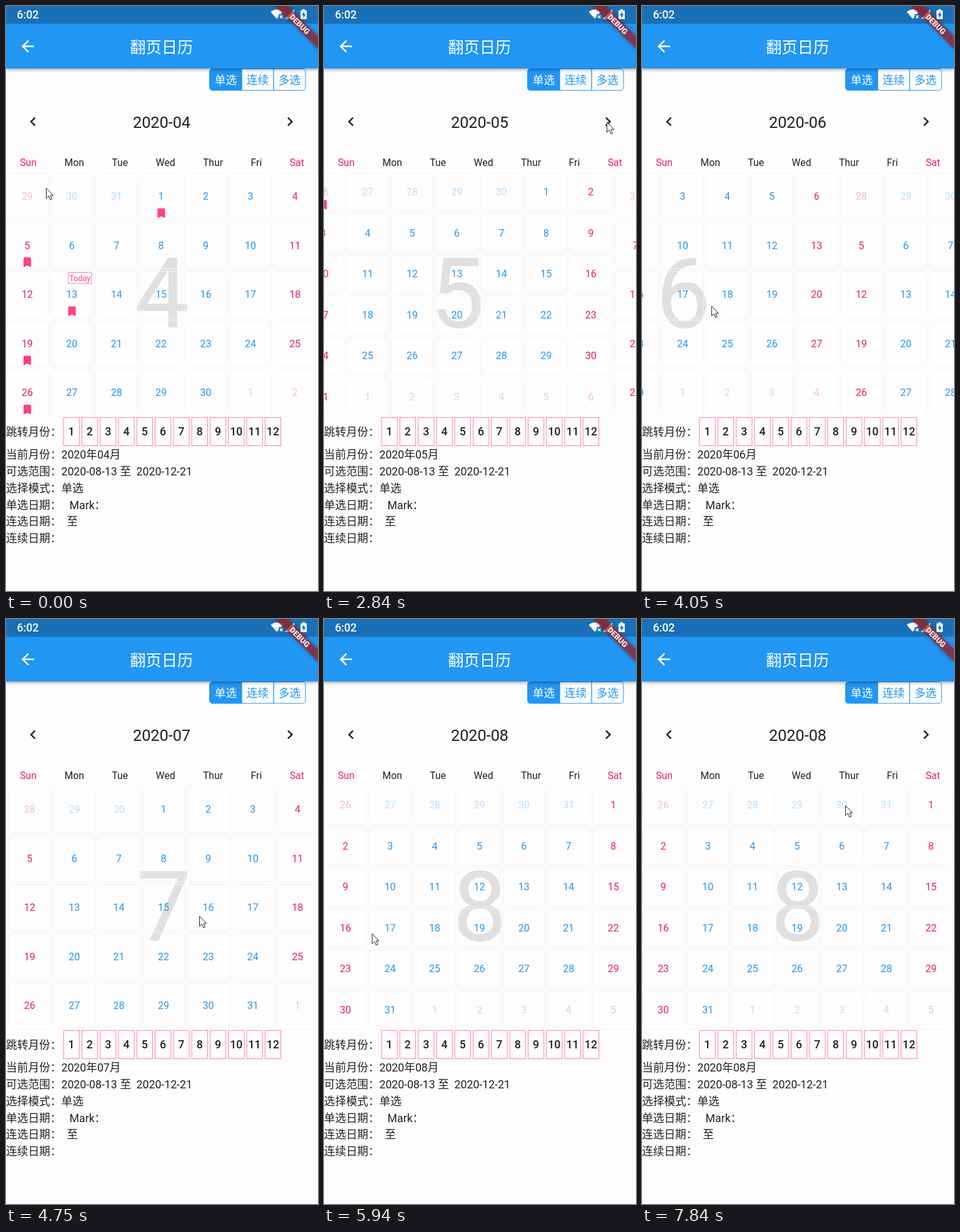
These frames come from a looping animation (499x936 px, 8 s). An HTML page:

```html
<!DOCTYPE html>
<html lang="zh-CN">
<head>
<meta charset="utf-8">
<style>
html, body { margin: 0; height: 100%; overflow: hidden; background: #fdfdfd }
svg { display: block; width: 100vw; height: 100vh }
text, .week { font-family: Roboto, "Noto Sans CJK SC", "Noto Sans CJK", sans-serif; white-space: pre }
.week { display: flex; justify-content: space-around; font-size: 15.8px; line-height: 20px; color: #212121 }
.week :first-child, .week :last-child { color: #e91e63 }
.bar { filter: drop-shadow(0 2px 2.5px rgba(0,0,0,.35)) }
.banner { filter: drop-shadow(0 0 3px rgba(0,0,0,.5)) }
</style>
</head>
<body>
<svg id="stage" viewBox="0 0 499 936"></svg>
<script>
const BLUE = '#2196f3', PINK = '#e91e63', ACCENT = '#ff4081', INK = '#212121';
const PAGE = 499.8, COL = PAGE / 7, TOP = 267, GRID = 393, BODY = 17.7, HEAD = 25.26;
const LOOP = 8000, TICK = 134, PHASE = 2840 % TICK;
const MIDDLE = 'text-anchor="middle"';

const text = (x, y, s, size, fill = INK, extra = MIDDLE) =>
  `<text x="${x}" y="${y}" font-size="${size}" fill="${fill}" ${extra}>${s}</text>`;
const icon = (d, x, y, scale, fill) =>
  `<path d="${d}" fill="${fill}" transform="translate(${x} ${y}) scale(${scale}) translate(-12 -12)"/>`;
const box = (x, y, w, h, stroke, rx = 0) =>
  `<rect x="${x}" y="${y}" width="${w}" height="${h}" rx="${rx}" fill="none" stroke="${stroke}"/>`;

const BOOKMARK = 'M17 3H7c-1.1 0-2 .9-2 2v16l7-3 7 3V5c0-1.1-.9-2-2-2z';

function monthPage(m) {
  const first = new Date(2020, m - 1, 1).getDay();
  const rows = Math.ceil((first + new Date(2020, m, 0).getDate()) / 7);
  const pitch = GRID / rows, h = pitch - 4;
  let out = text(249, 514, m, 155, '#e0e0e0');
  for (let i = 0; i < rows * 7; i++) {
    const day = new Date(2020, m - 1, i - first + 1), n = day.getDate();
    const c = i % 7, x = .5 + COL * c, y = TOP + pitch * Math.floor(i / 7), mid = x + 33.4;
    const inside = day.getMonth() === m - 1, april = day.getMonth() === 3;
    const today = april && n === 13;
    const marked = april && (n === 1 || today || c === 0 && n !== 12);
    const fill = c % 6 ? (inside ? BLUE : '#bbdefb') : (inside ? PINK : '#f8bbd0');
    out += box(x, y + .3, 67, h, '#f2f2f2', 5) + text(mid, y + h / 2 + 5.6, n, 16, fill);
    if (marked) out += icon(BOOKMARK, mid + .2, y + h - 10.2, .86, ACCENT);
    if (today)
      out += box(x + 27.8, y + 2.3, 37, 17.5, '#ff80ab') + text(x + 46.3, y + 15.3, 'Today', 12.6, ACCENT);
  }
  return `<g class="page">${out}</g>`;
}

function weekdays() {
  const names = 'Sun Mon Tue Wed Thur Fri Sat'.split(' ').map(s => `<span>${s}</span>`).join('');
  return `<foreignObject y="240.5" width="499" height="20"><div class="week">${names}</div></foreignObject>`;
}

function modes() {
  const label = (i, s) => text(351.5 + 51 * i, 124.7, s, BODY, i ? BLUE : '#fff');
  return `<path d="M377 100.5H330a4.5 4.5 0 0 0-4.5 4.5v25.5a4.5 4.5 0 0 0 4.5 4.5H377z" fill="${BLUE}"/>`
    + box(325.5, 100.5, 153.5, 34.5, BLUE, 4.5)
    + `<path d="M377 100v35M428 100v35" stroke="${BLUE}" stroke-width="1.3"/>`
    + label(0, '单选') + label(1, '连续') + label(2, '多选');
}

function details() {
  const line = (y, s, id = '') => text(0, y, s, BODY, INK, id);
  let out = line(688.3, '跳转月份：');
  for (let i = 0; i < 12; i++) {
    const x = 92 + 29.3 * i;
    out += box(x, 658.5, 25.3, 45, '#ff80ab')
      + text(x + 12.6, 687.4, i + 1, BODY, INK, MIDDLE + ' font-weight="500"');
  }
  const lines = ['', '可选范围：2020-08-13 至  2020-12-21', '选择模式：单选',
    '单选日期：   Mark：', '连选日期：  至', '连续日期：'];
  return out + lines.map((s, i) => line(724.4 + 26.7 * i, s, i ? '' : 'id="current"')).join('');
}

function statusIcons() {
  return `<path d="M423.5 9.5Q433 1.500 442.5 9.5L440 13H436V17L433 20.5Z" fill="#fff"/>
    <path d="M438 15l4.5 4.5m0-4.5l-4.5 4.5" stroke="#fff" stroke-width="1.5"/>
    <path d="M446 20.5H461V5.5Z" fill="#fff"/>
    <path d="M474 5h4v2h3v14h-10V7h3z" fill="#fff"/>
    <path d="M477 8.5l-4 6.5h2.5v4.5l4-6.5H477z" fill="#1a70b6"/>`;
}

function appBar() {
  return `<rect class="bar" width="499" height="100" fill="${BLUE}"/>
    <rect width="499" height="28.4" fill="#1a70b6"/>`
    + icon('M20 11H7.83l5.59-5.59L12 4l-8 8 8 8 1.41-1.41L7.83 13H20z', 35, 64.5, 1.263, '#fff')
    + text(248.7, 74.6, '翻页日历', HEAD, '#fff')
    + text(17.5, 20, '6:02', BODY, '#fff', 'font-weight="500"')
    + statusIcons()
    + `<g transform="translate(499 0) rotate(45)">
      <rect class="banner" x="-48.5" y="34" width="97" height="14.6" fill="#b71c1c" fill-opacity=".63"/>
      ${text(0, 45.7, 'DEBUG', 12.4, '#fff', MIDDLE + ' font-weight="900" fill-opacity=".9"')}</g>`;
}

const stage = document.getElementById('stage');
stage.innerHTML = '<rect width="499" height="936" fill="#fdfdfd"/>'
  + [4, 5, 6, 7, 8].map(monthPage).join('')
  + text(249, 195, '', HEAD, INK, 'id="title" ' + MIDDLE)
  + icon('M15.41 7.41L14 6l-6 6 6 6 1.41-1.41L10.83 12z', 43.2, 185, 1.22, INK)
  + icon('M10 6L8.59 7.41 13.17 12l-4.58 4.59L10 18l6-6z', 454.2, 185, 1.22, INK)
  + weekdays() + modes() + details() + appBar()
  + `<path id="cursor" d="M.5.5V16.5l3.8-3.5 2.6 6 2.7-1.2-2.6-5.7H11.5z" fill="#fff" stroke="#222" stroke-linejoin="round"/>`;

const clamp = u => Math.max(0, Math.min(1, u));
const smooth = u => u * u * (3 - 2 * u);
const tap = (t, start) => smooth(clamp((t - start) / 300));
const swipe = (t, start) => 1 - (1 - clamp((t - start) / 1014)) ** 3;
const pageAt = t => 4 + tap(t, 1770) + tap(t, 2791) + swipe(t, 3903) + swipe(t, 5000);

// Pointer stops: time, x, y
const STOPS = [[710, 64, 291], [1630, 452, 185.5], [2840, 452, 185.5], [3780, 339, 484],
  [4180, 30, 478], [4716, 309, 475], [5010, 290, 480], [5280, 30, 498], [5920, 76.5, 503],
  [6330, 154, 753], [6600, 286, 785], [7000, 365, 153], [7440, 360, 122], [7790, 325, 298]];

function pointerAt(t) {
  const i = STOPS.findIndex(s => s[0] > t);
  const b = STOPS.at(i), a = i > 0 ? STOPS[i - 1] : b;
  const u = smooth(clamp((t - a[0]) / (b[0] - a[0] || 1)));
  return [1, 2].map(k => a[k] + (b[k] - a[k]) * u);
}

const pages = stage.querySelectorAll('.page');
const [title, current, cursor] = ['title', 'current', 'cursor'].map(id => document.getElementById(id));

function draw(now) {
  // The screen refreshes in coarse ticks
  const t = Math.floor((now % LOOP - PHASE) / TICK) * TICK + PHASE;
  const page = pageAt(t), month = '0' + Math.round(page);
  pages.forEach((g, i) => g.setAttribute('transform', `translate(${(i + 4 - page) * PAGE} 0)`));
  title.textContent = '2020-' + month;
  current.textContent = `当前月份：2020年${month}月`;
  cursor.setAttribute('transform', `translate(${pointerAt(t)})`);
  requestAnimationFrame(draw);
}
draw(performance.now());
</script>
</body>
</html>
```
